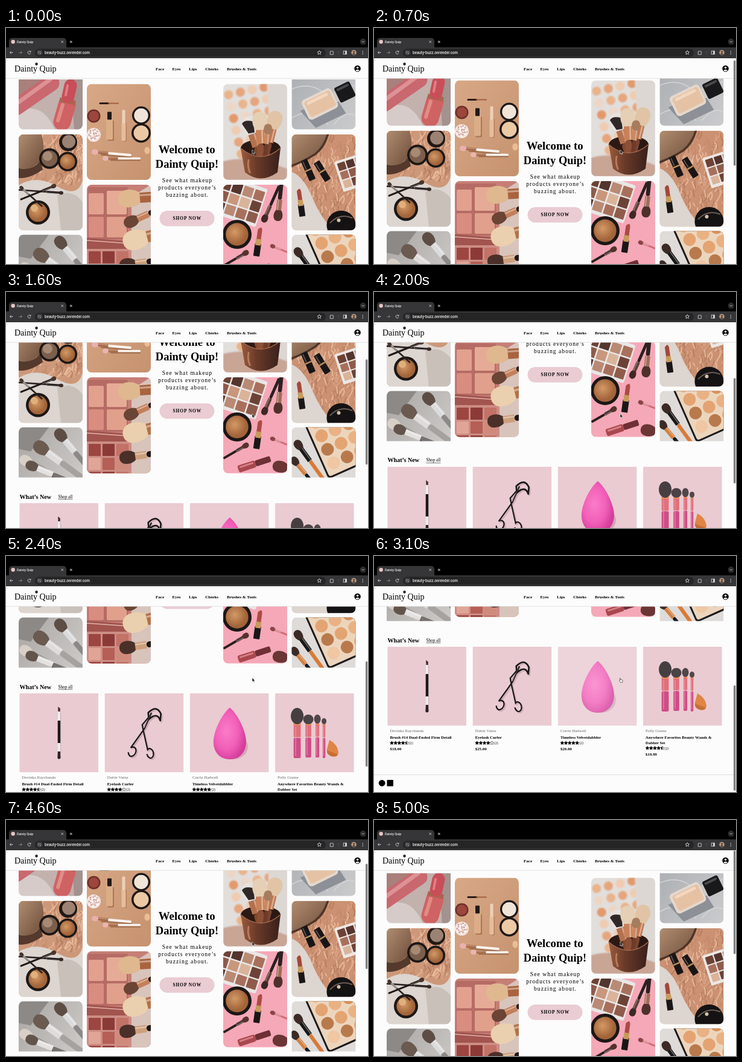
An HTML page that plays this animation: 600 px wide and 390 px high, repeating every 5100 ms.

```html
<!DOCTYPE html>
<html lang="en">
<head>
<meta charset="utf-8">
<title>Dainty Quip</title>
<style>
html, body { margin: 0; width: 100%; height: 100%; overflow: hidden; background: #fcfcfc; }
svg { display: block; width: 600px; height: 390px; }
text { font-family: "Liberation Serif", Times, serif; fill: #000; }
.b { font-weight: 700; }
.mid { text-anchor: middle; }
.ui text { font-family: Roboto, Arial, sans-serif; font-weight: 500; fill: #ededed; }
.ui path, .ui .o { fill: none; stroke: #d0d0d0; stroke-width: .9; }
.soft { filter: blur(.6px); }
.hazy { filter: blur(1.3px); }
</style>
</head>
<body>
<svg viewBox="0 0 600 390">
  <defs>
    <clipPath id="hero"><rect y="85" width="600" height="339.5"/></clipPath>
    <clipPath id="photo"><rect width="106" height="158.6" rx="8"/></clipPath>
    <linearGradient id="tan" x2="1" y2="1"><stop stop-color="#d8a886"/><stop offset="1" stop-color="#c6926f"/></linearGradient>
    <linearGradient id="grey" x2="1" y2="1"><stop stop-color="#a9a6a4"/><stop offset="1" stop-color="#d8d5d3"/></linearGradient>
    <linearGradient id="water" x2="1" y2="1"><stop stop-color="#a4a8ac"/><stop offset="1" stop-color="#cbcbcd"/></linearGradient>
    <linearGradient id="bag" x2="1" y2="1"><stop stop-color="#b08d70"/><stop offset="1" stop-color="#6b4a38"/></linearGradient>
    <linearGradient id="copper" x2="1"><stop stop-color="#9a5c40"/><stop offset=".4" stop-color="#6a3a29"/><stop offset="1" stop-color="#38201a"/></linearGradient>
    <radialGradient id="bronze" cx=".4" cy=".4"><stop stop-color="#d39a66"/><stop offset="1" stop-color="#a3643a"/></radialGradient>
    <radialGradient id="sponge" cx=".4" cy=".45" r=".6"><stop stop-color="#fb7cc8"/><stop offset=".6" stop-color="#f15fb8"/><stop offset="1" stop-color="#d43d9b"/></radialGradient>
  </defs>

  <rect width="600" height="390" fill="#fcfcfc"/>
  <g id="page">
    <g id="photos" clip-path="url(#hero)"></g>
    <g class="mid">
      <text class="b" x="299.7" y="207" font-size="18.9">Welcome to</text>
      <text class="b" x="300" y="231" font-size="18.5">Dainty Quip!</text>
      <g font-size="9.7" letter-spacing="1">
        <text x="300.5" y="255">See what makeup</text>
        <text x="300.5" y="267">products everyone’s</text>
        <text x="300.5" y="279">buzzing about.</text>
      </g>
      <rect x="254.5" y="302" width="91" height="25.5" rx="12.7" fill="#eaccd3"/>
      <text class="b" x="300.3" y="317.4" font-size="7.5" letter-spacing=".85">SHOP NOW</text>
    </g>
    <text class="b" x="22.5" y="459.5" font-size="10.1">What’s New</text>
    <text x="86.5" y="458.5" font-size="7.2">Shop all</text>
    <path d="M86.5 460.6H110.5" stroke="#222" stroke-width=".6"/>
    <g id="cards"></g>
    <path d="M0 678.5H600" stroke="#dcdcdc"/>
    <circle cx="13.2" cy="692.3" r="5.4"/>
    <rect x="21.5" y="687" width="10.5" height="10.5" rx="1"/>
  </g>

  <rect y="50" width="600" height="33" fill="#fcfcfc"/>
  <path d="M0 83.3H600" stroke="#dedede" stroke-width=".8"/>
  <text x="14" y="72" font-size="14">Dainty Quip</text>
  <circle cx="50.5" cy="59.5" r="2.3" fill="#222"/>
  <g font-size="7">
    <text class="b" x="248" y="69.5">Face</text>
    <text class="b" x="275.5" y="69.5">Eyes</text>
    <text class="b" x="303.3" y="69.5">Lips</text>
    <text class="b" x="330.3" y="69.5">Cheeks</text>
    <text class="b" x="366" y="69.5">Brushes &amp; Tools</text>
  </g>
  <circle cx="582.6" cy="67.1" r="5.3"/>
  <circle cx="582.6" cy="65.4" r="1.7" fill="#fff"/>
  <path d="M579.3 70.2Q582.6 66.6 585.9 70.2Q582.6 73 579.3 70.2Z" fill="#fff"/>
  <rect id="thumb" x="596" width="3.2" rx="1.6" fill="#7d7d7d"/>

  <g class="ui">
    <rect width="600" height="33"/>
    <rect y="32" width="600" height="18" fill="#363638"/>
    <rect x="5" y="16.5" width="95" height="20" rx="5" fill="#363638"/>
    <circle cx="11.7" cy="22.8" r="3.2" fill="#e9c4c6"/>
    <text x="18" y="24.7" font-size="5.3">Dainty Quip</text>
    <path d="M91.6 21.2l3.4 3.4m0-3.4l-3.4 3.4M105.6 22.9h4.4m-2.2-2.2v4.4"/>
    <circle cx="591.8" cy="22.6" r="5" fill="#2e2e2e"/>
    <path d="M590 21.8l1.8 1.8 1.8-1.8"/>
    <rect x="48" y="34.2" width="482" height="13.4" rx="6.7" fill="#252526"/>
    <path d="M11.8 40.6H6.6m2.2-2.3l-2.3 2.3 2.3 2.3"/>
    <path d="M21.3 40.6h5.2m-2.2-2.3l2.3 2.3-2.3 2.3" style="stroke:#8a8a8a"/>
    <path d="M40.6 39.2a2.5 2.5 0 1 0 .3 2.2M41 37.6v2h-2"/>
    <circle cx="55.6" cy="40.7" r="4.7" fill="#3d3d3e"/>
    <path d="M53 39.4h2.6m1.4 0h1.2M53 42h1m1.5 0h2.7"/>
    <text x="64" y="42.8" font-size="6.3">beauty-buzz.onrender.com</text>
    <path d="M519.3 37.2l1 2.2 2.3.2-1.7 1.6.5 2.4-2.1-1.2-2.1 1.2.5-2.4-1.7-1.6 2.3-.2z"/>
    <path d="M537.3 38.8h1.7q.8-2 1.6 0h1.7v1.6q1.8.8 0 1.7v1.7h-5z"/>
    <path d="M551.3 37.5v6" style="stroke:#555"/>
    <rect class="o" x="559.2" y="38" width="5.4" height="5.2"/>
    <rect x="562" y="38" width="2.6" height="5.2" fill="#d0d0d0"/>
    <circle cx="576.6" cy="40.6" r="4.3" fill="#b39a83"/>
    <circle cx="576.6" cy="39.5" r="1.6" fill="#54402f"/>
    <path d="M573.9 43.6q2.7-4 5.4 0q-2.7 2.2-5.4 0z" style="fill:#54402f;stroke:none"/>
    <g fill="#d0d0d0"><circle cx="591.3" cy="38.4" r=".7"/><circle cx="591.3" cy="40.7" r=".7"/><circle cx="591.3" cy="43" r=".7"/></g>
  </g>

  <path id="arrow" d="M408 201.3v6.8l1.6-1.5 1.1 2.4 1.1-.5-1.1-2.3h2.1z" fill="#111" stroke="#fff" stroke-width=".6"/>
  <path id="hand" d="M407.4 202.3q.8-.8 1.4 0v2.2l2.6.5q1 .2.8 1.2l-.5 2.6h-3.2l-2-2.6q.3-1 1-.4z" fill="#fff" stroke="#111" stroke-width=".6"/>
</svg>

<script>
const $ = id => document.getElementById(id);

// Shape helpers
const circ = (x, y, r, f) => `<circle cx="${x}" cy="${y}" r="${r}" fill="${f}"/>`;
const rect = (x, y, w, h, f, rx = 0) => `<rect x="${x}" y="${y}" width="${w}" height="${h}" rx="${rx}" fill="${f}"/>`;
const fill = (d, f) => `<path d="${d}" fill="${f}"/>`;
const line = (d, s, w, cap = 'round') => `<path d="${d}" fill="none" stroke="${s}" stroke-width="${w}" stroke-linecap="${cap}"/>`;
const turn = (x, y, a, inner) => `<g transform="translate(${x} ${y}) rotate(${a})">${inner}</g>`;
const group = (cls, inner) => `<g class="${cls}">${inner}</g>`;
const base = f => rect(0, 0, 106, 159, f);

// Brush lying along +x from the tip of its head
const brush = (x, y, a, len, w, hair, metal, grip) => {
  const h = w * 1.2, m = h + len * .25;
  return turn(x, y, a,
    rect(m, -w * .22, len - m, w * .44, grip, w * .2) +
    rect(h - 1, -w * .28, m - h + 1, w * .56, metal) +
    rect(h, -w * .18, m - h, w * .1, '#fff6') +
    fill(`M${h} ${-w * .28}C${h * .7} ${-w * .6} 0 ${-w * .6} 0 0S${h * .7} ${w * .6} ${h} ${w * .28}Z`, hair));
};
const compact = (x, y, r, f) => circ(x, y, r, '#1c1716') + circ(x, y, r * .78, f);
const pans = (cols, rows, size, step, colors, round) => {
  let out = '';
  for (let i = 0; i < cols * rows; i++)
    out += rect(i % cols * step, (i / cols | 0) * step, size, size, colors[i * 11 % colors.length], round ? size / 2 : 1);
  return out;
};
const lipstick = (x, y, a, k, tone) => turn(x, y, a,
  rect(-4 * k, 12 * k, 8 * k, 16 * k, '#1b1616', 1) + rect(-3.4 * k, 6 * k, 6.8 * k, 8 * k, '#c79a5c') +
  fill(`M${-2.8 * k} ${6 * k}V${-6 * k}Q${2 * k} ${-12 * k} ${2.8 * k} ${-5 * k}V${6 * k}Z`, tone));
const tube = (x, y, a) => turn(x, y, a, rect(-5.5, -17, 11, 36, '#191516', 1.5) + rect(-5.5, 0, 11, 2.5, '#b98f58') + rect(-3.5, -15, 2, 14, '#5a5150'));

let seed = 7;
const rnd = () => (seed = seed * 16807 % 2147483647) / 2147483647;
const fur = (x, y, w, h, n) => {
  let out = '';
  for (let i = 0; i < n; i++)
    out += line(`M${x + rnd() * w} ${y + rnd() * h}q${rnd() * 8 - 2} 3 ${rnd() * 12 - 8} 11`,
      ['#e8ba9c', '#b57d61', '#d9a384', '#c48b6c'][i % 4], 1.8);
  return group('soft', out);
};

const browns = ['#6d4236', '#b98a74', '#8f5b4b', '#d9b49a', '#54352e', '#a8705c', '#c9977b'];
const peach = ['#e9b284', '#d98f58', '#f0c7a2', '#b87a4c', '#e3a472'];
const pale = ['#e9b48c', '#e6a57c', '#efcbb0', '#e2996c', '#ecd6c6'];
const rose = ['#9d4540', '#d08a7c', '#b55f56', '#e0a596', '#c27266', '#8c3a38'];

const photos = [
  // Pink lip colours
  [21, 9, group('soft', `${base('#c2b1ad')}${fill('M0 70H60L0 120Z', '#a9807b')}
    ${fill('M0 128Q40 112 60 159H0Z', '#d6cbc9')}${fill('M86 70H106V159H92Z', '#a3928d')}
    ${line('M-4 122L54 82', '#c9686f', 27)}${line('M-2 115L52 76', '#dd9295', 7)}
    ${line('M80 118L72 146', '#cf6263', 29)}${line('M73 118L65 144', '#e18b85', 6)}
    ${line('M68 109L94 115', '#a9654f', 7, 'butt')}${line('M86 86L82 104', '#c84e59', 21)}${line('M81 86L78 102', '#e27e84', 4)}`)],
  // Compacts on fur
  [21, 175.7, `${base('#cd9879')}${fur(24, -8, 82, 84, 190)}
    ${fill('M0 84Q30 66 64 86T106 76V159H0Z', '#dcd5d0')}${fill('M64 100Q90 90 106 112V159H70Z', '#c9c0ba')}
    ${fill('M0 0H38Q46 30 34 46Q16 62 0 60Z', 'url(#bag)')}${fill('M0 56Q20 62 36 44L40 58Q18 74 0 72Z', '#54392c')}
    ${circ(82, 13, 15, '#1f1816')}${circ(83, 12, 11, '#9b8272')}${compact(51, 40, 17, '#7b5f4c')}${circ(48, 36, 8, '#a78a74')}
    ${compact(81, 45, 16, 'url(#bronze)')}${compact(32, 129, 20, 'url(#bronze)')}${circ(26, 122, 6, '#e0b07c')}
    ${brush(74, 97, 184, 82, 6, '#3a2a24', '#20191a', '#2b2221')}${brush(62, 84, 158, 64, 7, '#4d352b', '#332826', '#1d1717')}
    ${brush(2, 86, 42, 50, 6, '#47332b', '#8c8581', '#2a2120')}`],
  // Silver brushes
  [21, 341.5, group('soft', `${base('url(#grey)')}${fill('M0 0H50L20 40 0 36Z', '#8c8987')}
    ${brush(2, 50, 28, 120, 18, '#d8cfc7', '#97908c', '#55504e')}${brush(26, 26, 36, 110, 22, '#6b5a50', '#dedcdb', '#a5a2a0')}
    ${brush(62, 4, 50, 100, 19, '#5d4d44', '#dcdbdb', '#8c8988')}${brush(12, 60, 22, 110, 17, '#63544b', '#e4e2e1', '#77726f')}`)],
  // Flat lay on tan
  [134, 92.5, `${base('url(#tan)')}${line('M22 32H36', '#2c1c18', 3)}${line('M36 32H52', '#a4623d', 2)}
    ${circ(11.5, 53, 11, '#6e2f29')}${circ(11.5, 53, 8.5, '#9c473c')}
    ${rect(34, 60, 11, 34, '#a9764f', 2)}${rect(32, 58, 11, 34, '#dcae88', 2)}${rect(34, 46, 7, 13, '#1f1917', 1)}
    ${rect(59, 64, 7, 31, '#b07e58', 2)}${rect(57.5, 64, 7, 30, '#e6bd9e', 2)}${rect(58.5, 43, 5, 22, '#edd1b8', 1)}
    ${compact(90, 52, 15, '#f0e4d9')}${compact(90, 81, 16, '#ecc9a5')}
    ${circ(11.5, 84, 11.5, '#f2e5e0')}${Array.from({length: 24}, (_, i) => circ(11.5 + 1.9 * Math.sqrt(i) * Math.cos(i * 2.4), 84 + 1.9 * Math.sqrt(i) * Math.sin(i * 2.4), 1.2, ['#d6a49b', '#fff', '#c98f88'][i % 3])).join('')}
    ${line('M24 117L74 121M40 126H88', '#9c6c4c', 2)}
    ${brush(8, 112, 5, 66, 9, '#e9b0ae', '#a86a48', '#faf4f0')}${brush(26, 123, 0, 63, 8, '#e9b5b0', '#a86a48', '#faf4f0')}
    <ellipse cx="100" cy="110" rx="4.5" ry="6" fill="#e9bd95"/>`],
  // Rose palette
  [134, 259, `${base('#c67f76')}${rect(2, 4, 66, 86, '#b66c65', 2)}
    ${rect(3, 14, 25, 35, '#e2a08f', 2)}${rect(33, 10, 33, 39, '#e6ab96', 2)}${rect(3, 53, 25, 34, '#d88d80', 2)}${rect(33, 53, 33, 34, '#e0a08b', 2)}
    ${fill('M0 88L106 96V106H0Z', '#a2544f')}${line('M0 92L70 97', '#e2b3a9', 1.5)}
    ${rect(0, 106, 74, 53, '#cd8d84')}${turn(3, 110, 0, pans(3, 3, 20, 23, rose))}${fill('M74 20L106 0V159H74Z', '#d8c4bb')}
    ${brush(52, 24, -4, 90, 30, '#dfb88f', '#a9633f', '#3a2420')}${brush(62, 66, -24, 80, 20, '#6a4434', '#c37f5b', '#2a1d1b')}
    ${brush(60, 96, -14, 76, 34, '#ead0ae', '#b3704b', '#2b1d1b')}${brush(54, 134, -8, 76, 22, '#4a3028', '#cda07c', '#1f1818')}`],
  // Brushes in a cup
  [360, 92.5, `${base('#e2dedb')}${group('hazy', `${turn(0, 12, -12, pans(4, 6, 15, 20, pale, true))}
    ${fill('M72 0H106V159H82Z', '#dcd7d3')}${fill('M0 128Q40 116 106 140V159H0Z', '#c9a596')}`)}
    <ellipse cx="62" cy="106" rx="33" ry="14" fill="#2c1914"/>
    ${brush(39, 54, 72, 90, 25, '#e6e3df', '#b4714f', '#84482f')}${fill('M31 66Q35 58 50 62L52 80 42 82Z', '#2f2827')}
    ${brush(60, 46, 88, 90, 25, '#e5cfb5', '#c98158', '#8c5036')}${brush(89, 45, 104, 92, 25, '#e0c4a5', '#c07850', '#7b4430')}
    ${brush(75, 66, 96, 66, 14, '#a67c5e', '#c98a63', '#6e3b2a')}
    ${fill('M29 106Q62 134 95 106L90 146Q62 166 36 146Z', 'url(#copper)')}${line('M29 106Q62 134 95 106', '#a0664a', 1.6)}
    ${line('M42 126Q40 136 44 146', '#b97a5c', 3)}`],
  // Pink flat lay
  [360, 259, `${base('#f5a8b7')}${turn(-4, -18, 18, rect(0, 0, 82, 66, '#e9e6e6', 3) + turn(6, 6, 0, pans(4, 3, 16.5, 19, browns)))}
    ${brush(66, 62, -66, 66, 11, '#3d2826', '#5a3f38', '#2b1f20')}${brush(90, 60, -84, 70, 15, '#4f302b', '#a06d57', '#2d2021')}
    ${compact(23, 82, 24, 'url(#bronze)')}${lipstick(60, 82, 8, 1.3, '#ad4a45')}
    ${brush(42, 110, 150, 48, 9, '#55322c', '#4a3836', '#2a1f20')}${brush(78, 100, 22, 40, 7, '#8a4448', '#d98a92', '#cf6d7a')}
    ${turn(25, 152, -18, rect(0, -6, 30, 12, '#a9474f', 3) + rect(30, -5, 26, 10, '#6e2f35', 2) + rect(3, -4, 24, 3, '#d58086', 1))}
    ${brush(82, 146, 8, 40, 20, '#6b3535', '#8d5450', '#432626')}`],
  // Foundation bottle in water
  [473.5, 9, `${base('url(#water)')}${group('soft', `${line('M0 92Q30 80 50 96T106 84M0 140Q30 120 60 150M70 150Q90 126 106 136', '#d3d5d8', 1.5)}
    ${fill('M14 128L72 104 90 132 40 156Z', '#8d9096')}`)}
    ${turn(48, 117, -26, rect(-28, -19, 54, 36, '#e4d8ce', 6) + rect(-24, -15, 47, 28, '#e6c2a4', 4) + rect(-20, -13, 38, 5, '#f3d7bf', 2) + rect(26, -9, 6, 18, '#cfcac6') + rect(31, -14, 28, 27, '#19181a', 3) + rect(34, -11, 22, 4, '#4a494c', 2))}`],
  // Lipsticks on fur
  [473.5, 175.7, `${base('#cb9172')}${fur(6, 0, 100, 130, 260)}
    ${fill('M0 62Q20 70 34 104T70 159H0Z', '#ddd5d0')}
    ${fill('M0 0H58Q60 22 38 34Q18 42 0 56Z', 'url(#bag)')}${line('M0 52Q22 44 40 32Q54 20 60 0', '#4e3427', 3.5)}
    ${turn(70, 46, -18, rect(0, 0, 54, 52, '#ece7e3', 2) + turn(4, 4, 0, pans(3, 3, 13, 15, browns)))}
    ${tube(27, 58, -24)}${tube(50, 60, -32)}
    ${lipstick(13, 101, -8, 1.25, '#a2483b')}${circ(82, 150, 24, '#151214')}${line('M64 146Q80 130 100 138', '#6a5c55', 2)}${circ(78, 142, 3, '#d8c2a6')}`],
  // Warm palette
  [473.5, 341.5, `${base('#dedbd9')}${turn(28, 4, -24, rect(-3, -24, 110, 112, '#1d1a1a', 5) + rect(0, -21, 105, 106, '#ecd5bd', 4) + turn(5, -17, 0, pans(4, 4, 21, 24.5, peach, true)))}
    ${brush(6, 22, 54, 98, 14, '#3b2a25', '#191718', '#d97a35')}${brush(0, 50, 50, 80, 13, '#3a2b27', '#d3803f', '#19191a')}`]
];
$('photos').innerHTML = photos.map(([x, y, art]) =>
  `<g transform="translate(${x} ${y})" clip-path="url(#photo)">${art}</g>`).join('');

// Product cards
const tool = (x, top, w, h, len, hair) =>
  rect(x - w * .28, top + h - 2, w * .56, len * .42, '#e0707c', 1) + rect(x - w * .28, top + h + len * .4, w * .56, len * .6, '#cf4c86', 2) +
  rect(x - w * .28, top + h - 2, w * .56, 4, '#e98b5c') + line(`M${x - w * .12} ${top + h + 4}v${len - 8}`, '#ef9aa8', 1) +
  `<ellipse cx="${x}" cy="${top + h / 2}" rx="${w / 2}" ry="${h / 2}" fill="${hair}"/>`;
const curler = (c, w) => line('M39 98a6 8 25 1 0 4-8L66 58 77 33M70 101a5.5 8-12 1 0 1-8L64 62 62 52 74 38', c, w) +
  line('M72 32Q86 18 93 34M73 43Q87 30 92 45M72 32L73 43M93 34L92 45', c, w * 1.2);

const items = [
  ['Devinka Raychanda', ['Brush #14 Dual-Ended Firm Detail'], 4.5, '$18.00',
    rect(64, 33, 5, 67, '#d6b6be') + fill('M63.6 22L67.4 25 67 34H64Z', '#4a2f28') + rect(63.6, 30, 3.6, 16, '#f2f0f0') +
    rect(63.2, 45, 4.4, 38, '#1b191a', 1) + rect(63.4, 82, 4, 14, '#eeeced') + fill('M63.4 96H67.4L68 107Q65.4 110 62.8 107Z', '#2a2223')],
  ['Dottie Varne', ['Eyelash Curler'], 4, '$25.00',
    `<g transform="translate(2 2)">${curler('#cfacb5', 2.4)}</g>` + curler('#191718', 2.2) + line('M66 57L75 36', '#77706f', .6)],
  ['Corrie Hadwell', ['Timeless Velvetdabbler'], 5, '$20.00',
    '<ellipse cx="72" cy="88" rx="24" ry="21" fill="#cfa9b4"/>' + fill('M66 23.5C78 33 93 61 93 80C93 98 82 109 66 109C50 109 39 98 39 80C39 61 54 33 66 23.5Z', 'url(#sponge)')],
  ['Polly Gonne', ['Anywhere Favorites Beauty Wands &amp;', 'Dabber Set'], 4.5, '$19.99',
    tool(36.5, 24, 21, 27, 56, '#463f42') + tool(55, 35, 17, 16, 55, '#4b4346') + tool(70, 35, 11, 15, 56, '#50474a') + tool(81, 41, 8, 10, 56, '#50474a') +
    fill('M90 77Q103 84 105 97Q104 108 92 103Q83 99 87 88Z', '#df8546') + fill('M86 94L104 101Q99 107 91 103Q85 100 86 94Z', '#c66f35')]
];

const star = (x, y, rate) => {
  const pts = (from, to) => Array.from({length: to - from + 1}, (_, k) => {
    const i = from + k, r = i % 2 ? 1.5 : 3.2, a = i * Math.PI / 5;
    return (x + r * Math.sin(a)).toFixed(2) + ',' + (y - r * Math.cos(a)).toFixed(2);
  }).join(' ');
  return `<polygon points="${pts(0, 9)}" fill="${rate >= 1 ? '#000' : 'none'}" stroke="#000" stroke-width=".5"/>` +
    (rate === .5 ? `<polygon points="${pts(5, 10)}"/>` : '');
};

$('cards').innerHTML = items.map(([who, title, stars, price, art], n) => {
  const x = 22.5 + n * 141.2, tx = x + 4, y = 619 + (title.length - 1) * 8.5;
  let s = `<g id="card${n}"><g transform="translate(${x} 467)">${rect(0, 0, 130.5, 130.3, '#eacbd2')}${art}</g></g>`;
  s += `<text x="${tx}" y="608.3" font-size="6.9" style="fill:#666">${who}</text>`;
  title.forEach((row, i) => s += `<text class="b" x="${tx}" y="${619.3 + i * 8.5}" font-size="6.8">${row}</text>`);
  for (let i = 0; i < 5; i++) s += star(tx + 3 + i * 6.2, y + 7, Math.min(1, Math.max(0, stars - i)));
  return s + `<text x="${tx + 31.5}" y="${y + 9}" font-size="5.6">(2)</text>` +
    `<text class="b" x="${tx}" y="${y + 19}" font-size="6.9">${price}</text>`;
}).join('');

// Scroll position over time: [ms, px]
const LOOP = 5100, STEP = 100;
const track = [[0, 0], [450, 0], [700, 6], [1600, 118], [2400, 240], [2950, 317], [3900, 317], [4600, 42], [4850, 2], [5000, -3], [5100, -3]];
const slope = track.map((p, i) => {
  if (!i || i === track.length - 1) return 0;
  const [a, b] = [track[i - 1], track[i + 1]];
  const l = (p[1] - a[1]) / (p[0] - a[0]), r = (b[1] - p[1]) / (b[0] - p[0]);
  return l * r > 0 ? 2 * l * r / (l + r) : 0;
});
function scrollAt(t) {
  const i = track.findIndex((p, k) => k && t <= p[0]) - 1;
  const [t0, a] = track[i], [t1, b] = track[i + 1], h = t1 - t0, u = (t - t0) / h, v = 1 - u;
  return a * v * v * (1 + 2 * u) + b * u * u * (3 - 2 * u) + h * u * v * (slope[i] * v - slope[i + 1] * u);
}
const ramp = (t, a, b) => Math.min(1, Math.max(0, (t - a) / (b - a)));

function draw(t) {
  const y = scrollAt(t), over = Math.max(0, -y), hover = y > 265;
  $('page').setAttribute('transform', `translate(0 ${-y.toFixed(2)})`);
  $('thumb').setAttribute('y', 50.5 + Math.max(0, y) * .515);
  $('thumb').setAttribute('height', 174 - over);
  $('thumb').setAttribute('opacity', t < 3800 ? ramp(t, 350, 500) * (1 - ramp(t, 3350, 3600)) : ramp(t, 3900, 4000));
  $('card2').setAttribute('opacity', hover ? .8 : 1);
  $('arrow').setAttribute('visibility', hover ? 'hidden' : 'visible');
  $('hand').setAttribute('visibility', hover ? 'visible' : 'hidden');
}

const start = performance.now();
(function tick() {
  const t = (performance.now() - start) % LOOP;
  draw(Math.floor(t / STEP) * STEP);
  requestAnimationFrame(tick);
})();
</script>
</body>
</html>
```
